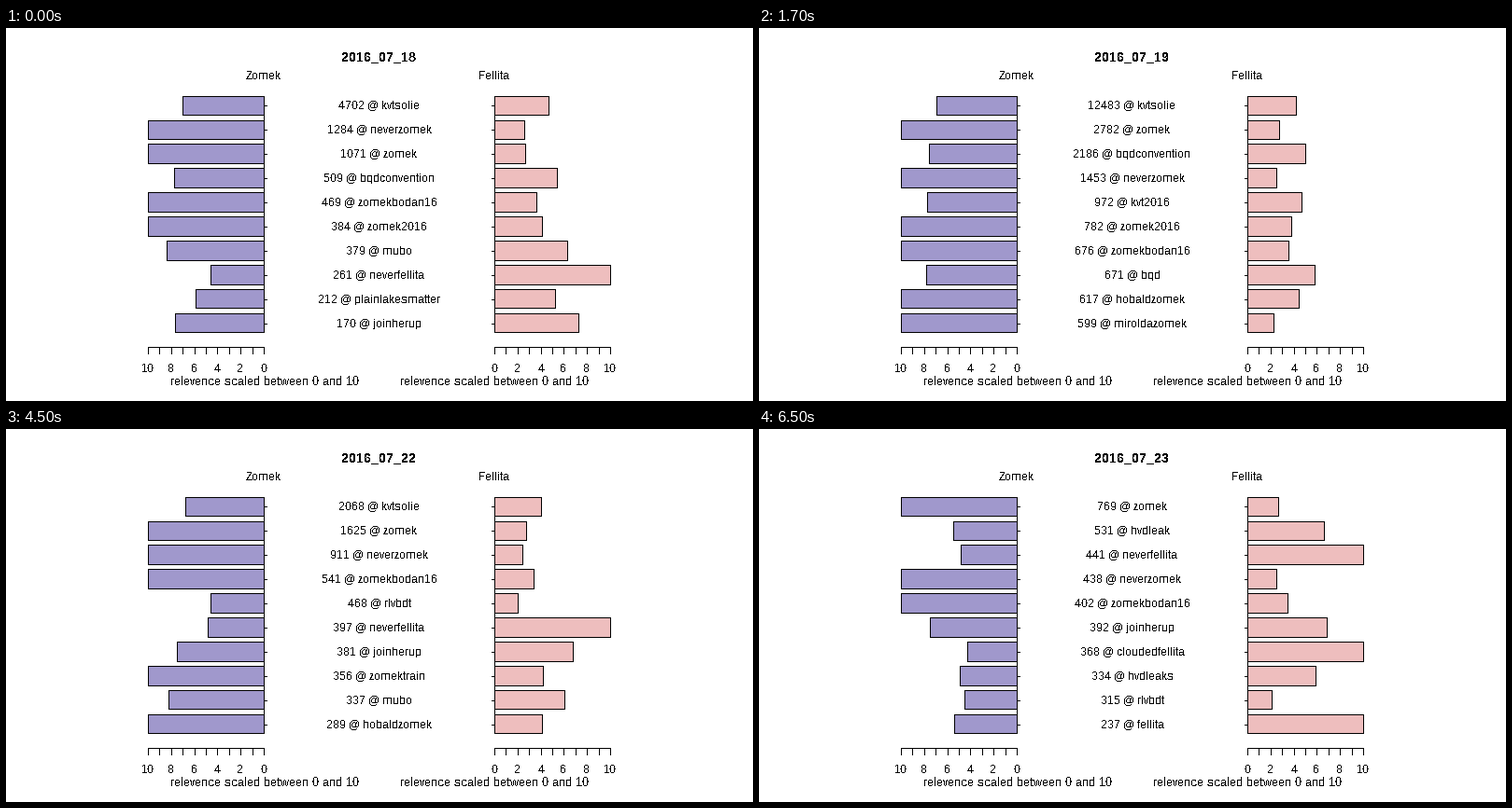
These frames come from a looping animation (800 by 400 pixels, 8000 ms). A matplotlib script:

```python
import math

import matplotlib.pyplot as plt
from matplotlib.animation import FuncAnimation
from matplotlib.patches import Rectangle

WIDTH, HEIGHT, DPI = 800, 400, 100
PX = 72 / DPI
UNIT = 12.4                      # pixels per relevance point
LEFT_ZERO, RIGHT_ZERO = 276, 523
ROW_TOP, ROW_STEP, BAR_HEIGHT = 73.1, 25.9, 20.7
LEFT_FILL, RIGHT_FILL = "#a098cc", "#eebebe"

plt.rcParams.update({
    "font.family": "Liberation Sans",
    "text.hinting": "native",
    "text.hinting_factor": 1,
    "text.antialiased": False,
})

# date, then rows of (count, tag, left relevance, right relevance)
DAYS = [
    ("2016_07_18", [
        (4702, "kvtsolie", 7.02, 4.68), (1284, "neverzomek", 10, 2.58),
        (1071, "zomek", 10, 2.66), (509, "bqdconvention", 7.74, 5.4),
        (469, "zomekbodan16", 10, 3.63), (384, "zomek2016", 10, 4.11),
        (379, "mubo", 8.39, 6.29), (261, "neverfellita", 4.6, 10),
        (212, "plainlakesmatter", 5.89, 5.24), (170, "joinherup", 7.66, 7.26)]),
    ("2016_07_19", [
        (12483, "kvtsolie", 6.94, 4.19), (2782, "zomek", 10, 2.74),
        (2186, "bqdconvention", 7.58, 5), (1453, "neverzomek", 10, 2.5),
        (972, "kvt2016", 7.74, 4.68), (782, "zomek2016", 10, 3.79),
        (676, "zomekbodan16", 10, 3.55), (671, "bqd", 7.82, 5.81),
        (617, "hobaldzomek", 10, 4.44), (599, "miroldazomek", 10, 2.26)]),
    ("2016_07_20", [
        (5175, "kvtsolie", 6.85, 4.11), (1651, "zomek", 10, 2.74),
        (841, "bqdconvention", 7.5, 4.84), (839, "neverzomek", 10, 2.5),
        (622, "freeduvi", 4.19, 3.39), (499, "zomekbodan16", 10, 3.55),
        (459, "neverfellita", 4.76, 10), (437, "kvt2016", 7.66, 4.6),
        (421, "rlvbdt", 4.76, 2.26), (415, "zomek2016", 10, 3.63)]),
    ("2016_07_22", [
        (2068, "kvtsolie", 6.77, 4.03), (1625, "zomek", 10, 2.74),
        (911, "neverzomek", 10, 2.42), (541, "zomekbodan16", 10, 3.39),
        (468, "rlvbdt", 4.6, 2.02), (397, "neverfellita", 4.84, 10),
        (381, "joinherup", 7.5, 6.77), (356, "zomektrain", 10, 4.19),
        (337, "mubo", 8.23, 6.05), (289, "hobaldzomek", 10, 4.11)]),
    ("2016_07_23", [
        (769, "zomek", 10, 2.66), (531, "hvdleak", 5.48, 6.61),
        (441, "neverfellita", 4.84, 10), (438, "neverzomek", 10, 2.5),
        (402, "zomekbodan16", 10, 3.47), (392, "joinherup", 7.5, 6.85),
        (368, "cloudedfellita", 4.27, 10), (334, "hvdleaks", 4.92, 5.89),
        (315, "rlvbdt", 4.52, 2.1), (237, "fellita", 5.4, 10)]),
]

fig = plt.figure(figsize=(WIDTH / DPI, HEIGHT / DPI), dpi=DPI, facecolor="white")
ax = fig.add_axes([0, 0, 1, 1])
ax.set(xlim=(0, WIDTH), ylim=(HEIGHT, 0))
ax.axis("off")


def line(x0, y0, x1, y1):
    ax.plot([x0 + .5, x1 + .5], [y0 + .5, y1 + .5], color="black", lw=PX,
            solid_capstyle="projecting", antialiased=False, snap=False, zorder=3)


def label(x, baseline, text="", size=12, weight="normal"):
    return ax.text(x, baseline, text, size=size * PX, weight=weight,
                   ha="center", va="baseline")


def bar(top, bottom, fill):
    return ax.add_patch(Rectangle((0, top + .5), 0, bottom - top, facecolor=fill,
                                  edgecolor="black", lw=PX, joinstyle="miter",
                                  antialiased=False, snap=False))


def draw_scale(zero, direction, name):
    line(zero, 342, zero + direction * 10 * UNIT, 342)
    for value in range(11):
        x = round(zero + direction * value * UNIT)
        line(x, 342, x, 349)
        if value % 2 == 0:
            label(x, 369, str(value))
    label(zero, 55, name)
    label(zero + .5, 383, "relevence scaled between 0 and 10", 12.5)
    line(zero, 83, zero, 316)


draw_scale(LEFT_ZERO, -1, "Zomek")
draw_scale(RIGHT_ZERO, 1, "Fellita")
title = label(399.5, 35, size=14.4, weight="bold")

rows = []
for i in range(10):
    edge = ROW_TOP + i * ROW_STEP
    top, bottom = math.floor(edge), math.floor(edge + BAR_HEIGHT)
    middle = round(edge + BAR_HEIGHT / 2)
    line(LEFT_ZERO, middle, LEFT_ZERO + 3, middle)
    line(RIGHT_ZERO - 3, middle, RIGHT_ZERO, middle)
    rows.append((bar(top, bottom, LEFT_FILL), bar(top, bottom, RIGHT_FILL),
                 label(399.5, middle + 4)))


def update(frame):
    date, entries = DAYS[(frame + 3) // 4]
    title.set_text(date)
    for (left, right, text), (count, tag, left_value, right_value) in zip(rows, entries):
        left_width = round(left_value * UNIT)
        left.set_x(LEFT_ZERO - left_width + .5)
        left.set_width(left_width)
        right.set_x(RIGHT_ZERO + .5)
        right.set_width(round(right_value * UNIT))
        text.set_text(f"{count} @ {tag}")
    return []


animation = FuncAnimation(fig, update, frames=16, interval=500, repeat=True,
                          repeat_delay=0)
plt.show()
```
